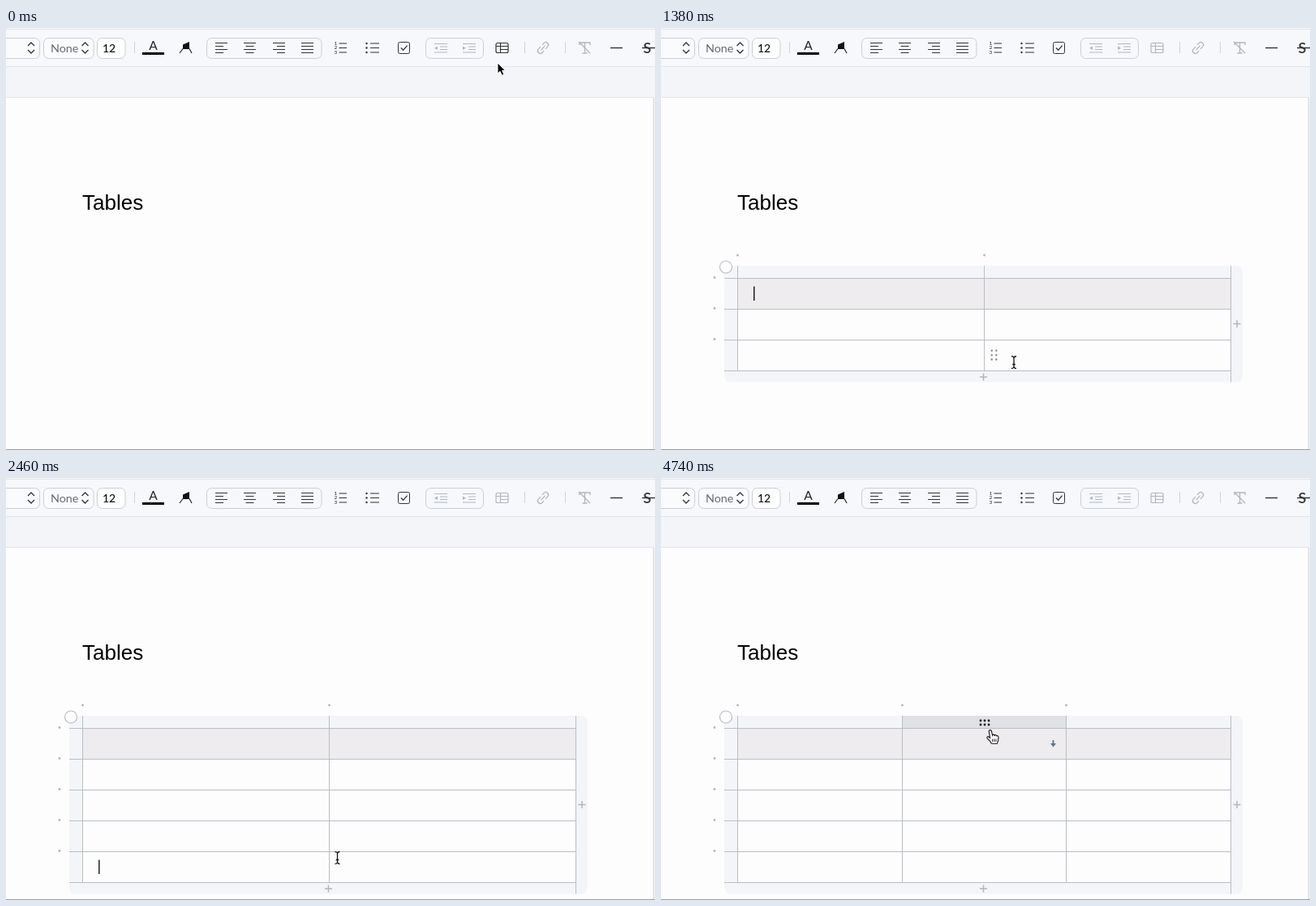
Animation, 800 px wide and 520 px high, one loop 4800 ms. Source, as an HTML page:

```html
<!DOCTYPE html>
<html lang="en">
<head>
<meta charset="utf-8">
<title>Inserting a table</title>
<style>
  html, body { margin: 0; width: 100%; height: 100%; overflow: hidden; background: #f3f5f7; }
  svg { display: block; }
  text { font-family: Lato, "Open Sans", sans-serif; }
  .title { font-family: "Liberation Sans", Arial, sans-serif; }
</style>
</head>
<body>
<svg id="stage" width="800" height="520" viewBox="0 0 800 520">
  <rect width="800" height="520" fill="#f3f5f8"/>
  <rect width="800" height="47" fill="#f6f8fb"/>
  <path d="M0 1.5H800M0 47.5H800" stroke="#e1e4e9"/>
  <rect x="-5" y="85.5" width="803" height="440" fill="#fefdfe" stroke="#e2e4e8"/>
  <path d="M798.5 86V520" stroke="#d9dce0"/>
  <text class="title" x="94" y="224" font-size="26">Tables</text>
  <g id="toolbar" fill="none" stroke="#333" stroke-width="1.2"></g>
  <g id="table"></g>
  <g id="caret"></g>
  <g id="pointer"></g>
  <path d="M0 519.5H800" stroke="#9c9c9e"/>
</svg>
<script>
const LOOP = 4800, STEP = 60;
const LINE = '#b9bec4', MUTED = '#b2b6bb', BAR = '#f3f5f8', HOVER = '#dfe1e4', ACCENT = '#4a7fd0';
const LEFT = 94.5, TOP = 308.5, WIDTH = 608, ROW = 38;
const el = id => document.getElementById(id);
const range = n => [...Array(n).keys()];

const path = (d, color, width = 1, fill = 'none') =>
  `<path d="${d}" stroke="${color}" stroke-width="${width}" fill="${fill}"/>`;
const rect = (x, y, w, h, fill, rx = 0, stroke = 'none') =>
  `<rect x="${x}" y="${y}" width="${w}" height="${h}" rx="${rx}" fill="${fill}" stroke="${stroke}" stroke-width="1"/>`;
const dot = (x, y, r, fill) => `<circle cx="${x}" cy="${y}" r="${r}" fill="${fill}" stroke="none"/>`;
const label = (x, y, size, text, fill, extra = '') =>
  `<text x="${x}" y="${y}" font-size="${size}" fill="${fill}" stroke="none" ${extra}>${text}</text>`;
const plus = (x, y, color, r = 4.5) => path(`M${x - r} ${y}h${2 * r}M${x} ${y - r}v${2 * r}`, color, 1.5);
const dotGrid = (x, y, cols, rows, gap, r, fill) => range(cols * rows).map(i =>
  dot(x + (i % cols - (cols - 1) / 2) * gap, y + (Math.floor(i / cols) - (rows - 1) / 2) * gap, r, fill)).join('');

// Toolbar
const frame = (x, w, fill = 'none') => rect(x, 12.5, w, 25, fill, 6, '#cbced4');
const chevrons = x => path(`M${x - 4} 22l4 -4 4 4M${x - 4} 27l4 4 4 -4`, '#333', 1.3);
const alignIcon = (x, shift, short) => path(range(4).map(i => {
  const w = i % 2 ? short : 15;
  return `M${x - 7.5 + (15 - w) * shift} ${18.5 + 4 * i}h${w}`;
}).join(''), '#333', 1.2);
const indentIcon = (x, dir) => path(`M${x - 8} 19.5h16M${x - 1} 23h9M${x - 1} 26.5h9M${x - 8} 30h16`, MUTED, 1.2) +
  path(dir < 0 ? `M${x - 4} 22.5v4.5l-4 -2.2z` : `M${x - 8} 22.5v4.5l4 -2.2z`, 'none', 0, MUTED);

const fixedTools = [
  frame(-12, 53.5, '#fafbfd'), chevrons(31),
  frame(46.5, 61.5, '#fafbfd'), label(55, 29.5, 14.3, 'None', '#66686c'), chevrons(97.5),
  frame(112.5, 34.5, '#fefefe'), label(119, 29.5, 14, '12', '#111', 'font-weight="500"'),
  path('M158.5 17v14M639.5 17v14M689.5 17v14', '#d0d3d8'),
  label(181.5, 27, 15.5, 'A', '#222', 'text-anchor="middle"'), rect(168, 30, 27, 3, '#000'),
  path('M218 20.5L226 17V26H218z', 'none', 0, '#111'), path('M218 25.5l-4 5.5M226 25.5l3 5.5', '#222', 1.2),
  frame(247.5, 141.5),
  alignIcon(265.5, 0, 10), alignIcon(300.5, .5, 10), alignIcon(336.5, 1, 10), alignIcon(371.5, 0, 15),
  range(3).map(i => label(404.5, 21 + 5.4 * i, 6.5, i + 1, '#222') +
    path(`M410.5 ${19 + 5.5 * i}h9.5M449 ${19 + 5.5 * i}h11`, '#333', 1.2) +
    dot(444.5, 19 + 5.5 * i, 1.2, '#333')).join(''),
  rect(483.5, 17.5, 14, 14, 'none', 2, '#333'), path('M487 24.5l2.7 2.8 4.8 -5.6', '#333', 1.3),
  frame(517.5, 71), indentIcon(536, -1), indentIcon(571, 1),
  `<g transform="translate(662 24.5) rotate(-48)">${
    path('M-1 -3.2H-5a3.2 3.2 0 0 0 0 6.4H-2M1 3.2H5a3.2 3.2 0 0 0 0 -6.4H2M-3.5 0H3.5', MUTED, 1.3)}</g>`,
  path('M707 21V18H720V21M713.5 18V31M710.5 31h6M706 17L720 31', MUTED, 1.3),
  path('M745 24.5h15', '#333', 1.4),
  label(785.5, 31, 18, 'S', '#333', 'font-weight="600"'), path('M784 24.5h16', '#333', 1.4)
].join('');

const tableButton = (hovered, enabled) =>
  (hovered ? rect(594, 12, 35, 25.5, '#dcdcde', 6) : '') +
  path('M606 18.5h11a2 2 0 0 1 2 2v8a2 2 0 0 1 -2 2h-11a2 2 0 0 1 -2 -2v-8a2 2 0 0 1 2 -2zM604 22.5h15M609.5 18.5v12M609.5 26.5h9.5',
    enabled ? '#333' : MUTED, 1.2);

// Pointer: time, x, y
const route = [
  [0, 606, 43], [300, 612.5, 27], [1080, 612.5, 27], [1380, 435, 412], [1560, 419.5, 433],
  [1860, 419.5, 433], [2220, 408.5, 468], [2580, 408.5, 468], [3000, 402, 301], [3180, 401, 282],
  [3960, 401, 282], [4380, 406, 311], [LOOP, 406, 311]
];
function pointerAt(t) {
  const i = route.findIndex((p, k) => k && t <= p[0]);
  const [t0, x0, y0] = route[i - 1], [t1, x1, y1] = route[i];
  const u = (t - t0) / (t1 - t0), e = u * u * (3 - 2 * u);
  return { x: x0 + (x1 - x0) * e, y: y0 + (y1 - y0) * e };
}
const shapes = {
  arrow: path('M0 0V13.2L3 10.4 5.4 15.4 7.9 14.2 5.6 9.4H9.6Z', '#fff', 1, '#000'),
  beam: ['#fff', '#111'].map((c, i) =>
    path('M-3 -7.5Q0 -7.5 0 -5Q0 -7.5 3 -7.5M0 -5.5V5.5M-3 7.5Q0 7.5 0 5Q0 7.5 3 7.5M-1.8 2.5H1.8', c, i ? 1.3 : 3)).join(''),
  hand: path('M-1.8 1C-1.7 -.9 1.2 -.9 1.5 1L2.5 6C3 4.7 4.9 4.8 5.2 6.2C6 5.3 7.5 5.6 7.8 6.9C8.8 6.3 10 6.9 10 8.5L9.6 12.5 8.4 16.3H1.5L-1 12.6 -4 9.6C-4.8 8 -3 7 -1.6 8.3L-.4 9.2Z',
    '#111', 1.1, '#fff') + path('M2.6 10.5v3.5M4.8 10.5v3.5M7 10.5v3.5', '#111', .9)
};

const idle = [[1740, 1920], [2460, 2640], [3660, 4020]];
const caretShown = [[360, 720], [1140, 1500], [1740, 2100], [2460, 2820], [3180, 3540], [3660, 4020], [4380, 4740]];
const within = (spans, t) => spans.some(([a, b]) => t >= a && t < b);

function tableState(t) {
  const rows = t < 1740 ? 3 : t < 2460 ? 4 : 5, cols = t < 3660 ? 2 : 3;
  const xs = range(cols + 1).map(k => LEFT + Math.round(WIDTH * k / cols));
  return { rows, cols, xs, end: TOP + ROW * rows };
}

function hoverAt({ x, y }, { rows, xs, end }, t) {
  if (t < 420 || within(idle, t)) return {};
  const col = xs.findIndex((left, k) => x >= left && x < xs[k + 1]);
  if (col < 0 || y > end + 14) return {};
  if (y >= end) return { addRow: true, hand: true };
  if (y >= 312) return { cell: true, col, row: Math.floor((y - TOP) / ROW) };
  if (y >= 293) return { header: true, col, hand: true };
  return y > 270 && Math.abs(x - xs[col]) < 10 ? { insert: true, col, hand: true } : {};
}

function drawTable({ rows, cols, xs, end }, hover) {
  const right = xs[cols], bottom = end + 14, middle = (293 + bottom) / 2;
  const parts = [
    rect(78, 293, 639, bottom - 293, BAR, 8),
    rect(LEFT, TOP, WIDTH, end - TOP, '#fefdfe'),
    rect(LEFT, TOP, WIDTH, ROW, '#eeecee')
  ];
  if (hover.header) parts.push(rect(xs[hover.col], 293, xs[hover.col + 1] - xs[hover.col], 15.5, HOVER));
  if (hover.addRow) parts.push(path(`M78 ${end}H717V${bottom - 8}q0 8 -8 8H86q-8 0 -8 -8Z`, 'none', 0, HOVER));
  parts.push(
    path(range(rows + 1).map(i => `M78 ${TOP + ROW * i}H${right}`).join('') +
      xs.map((x, k) => `M${x} 293V${k === cols ? bottom : end}`).join(''), LINE),
    xs.slice(0, -1).map(x => dot(x, 280, 1.4, MUTED)).join(''),
    range(rows).map(i => dot(66, TOP - 1 + ROW * i, 1.4, MUTED)).join(''),
    `<circle cx="80" cy="294.5" r="7.5" fill="#fefdfe" stroke="${LINE}" stroke-width="1.2"/>`,
    plus(710, middle - .25, MUTED), plus(397.5, bottom - 6.5, hover.addRow ? '#333' : MUTED)
  );
  if (hover.cell) parts.push(dotGrid(xs[hover.col] + 12, TOP + ROW * (hover.row + .5) - .5, 2, 3, 5.5, 1.2, '#85888c'));
  if (hover.header) parts.push(dotGrid((xs[hover.col] + xs[hover.col + 1]) / 2 + .5, 301.5, 3, 2, 5, 1.4, '#111'));
  if (hover.header || hover.row === 0) {
    const x = xs[hover.col + 1] - 16;
    parts.push(path(`M${x} 323v5`, '#62728c', 1.8), path(`M${x - 3.5} 327h7l-3.5 4.5z`, 'none', 0, '#62728c'));
  }
  if (hover.insert) {
    const x = xs[hover.col];
    parts.push(path(`M${x} 288V${end}`, ACCENT, 2), dot(x, 280, 8, ACCENT), plus(x, 280, '#fff', 4));
  }
  return parts.join('');
}

function drawCaret(t, table) {
  if (!within(caretShown, t)) return '';
  let x = LEFT, y = 274;
  if (t >= 420) {
    const row = t >= 1740 && t < 3660 ? table.rows - 1 : 0;
    x = (t >= 3660 ? table.xs[1] : LEFT) + 20.3;
    y = 318.5 + ROW * row;
  }
  return path(`M${x} ${y}v17.5`, '#000', 1.3);
}

function render(t) {
  const p = pointerAt(t), table = tableState(t), made = t >= 420;
  const hover = hoverAt(p, table, t);
  const shape = hover.hand ? 'hand' : p.y > 86 ? 'beam' : 'arrow';
  el('toolbar').innerHTML = fixedTools + tableButton(!made && p.y < 37.5, !made);
  el('table').innerHTML = made ? drawTable(table, hover) : '';
  el('caret').innerHTML = drawCaret(t, table);
  el('pointer').innerHTML = `<g transform="translate(${p.x} ${p.y})">${shapes[shape]}</g>`;
}

const start = performance.now();
let shown = -1;
function tick() {
  const t = Math.floor((performance.now() - start) % LOOP / STEP) * STEP;
  if (t !== shown) render(shown = t);
  requestAnimationFrame(tick);
}
tick();
</script>
</body>
</html>
```
